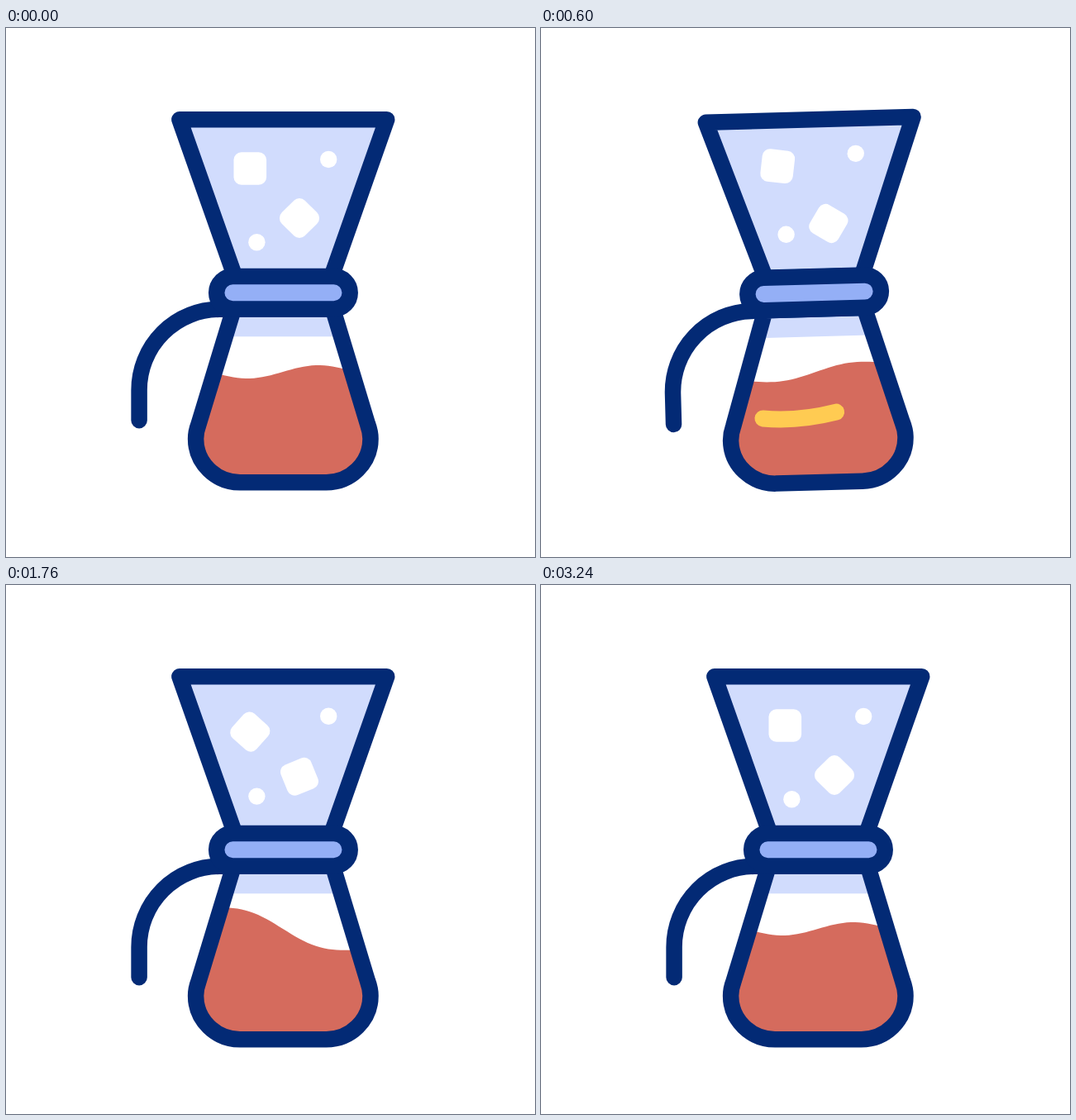
An HTML page for the animation above (3340 ms loop, 640 px wide and 640 px high).

```html
<!DOCTYPE html>
<html lang="en">
<head>
<meta charset="utf-8">
<title>Carafe</title>
<style>
  html, body { margin: 0; width: 100%; height: 100%; overflow: hidden; background: #fff; }
  svg { display: block; width: 100%; height: 100%; }
  .line { fill: none; stroke: #032a75; stroke-width: 19.5; stroke-linecap: round; stroke-linejoin: round; }
  .glass { fill: #d1dcfd; }
  .ice { fill: #fff; }
</style>
</head>
<body>
<svg viewBox="0 0 640 640">
  <defs>
    <path id="flask" d="M275.4 340 L233 479.5 C230.5 486 229.6 491 229.6 497 A53.5 52.7 0 0 0 283.1 549.7 H387.5 A53.5 52.7 0 0 0 441 497 C441 491 440 486 437.6 479.5 L395.4 340 Z"/>
    <clipPath id="inside"><use href="#flask"/></clipPath>
  </defs>
  <g id="carafe">
    <path class="line" style="fill:#d1dcfd" d="M209.9 110.7 H460.7 L393.7 301 H277 Z"/>
    <g class="ice">
      <rect id="cubeA" x="-19.8" y="-19.8" width="39.6" height="39.6" rx="9.4"/>
      <rect id="cubeB" x="-19.8" y="-19.8" width="39.6" height="39.6" rx="9.4"/>
      <circle id="dotA" r="10.2"/>
      <circle id="dotB" r="10.2"/>
    </g>
    <g clip-path="url(#inside)">
      <rect class="glass" x="220" y="335" width="230" height="38.3"/>
      <path id="drink" fill="#d56b5d"/>
    </g>
    <use href="#flask" class="line"/>
    <path class="line" d="M262 340.3 H258.7 A97.6 97.6 0 0 0 161.1 437.9 V474.7"/>
    <rect class="line" style="fill:#94aff6" x="254.7" y="300.5" width="161.5" height="39.4" rx="19.7"/>
  </g>
  <path id="swoosh" pathLength="100" fill="none" stroke="#ffcb52" stroke-width="20" stroke-linecap="round"
        d="M134.5 363 C146 410 185 467 264 472 C300 476 335 471 365 462.5"/>
</svg>
<script>
const LOOP = 3340, STIR_START = 280, STIR_END = 3240;
const $ = id => document.getElementById(id);
const clamp = x => Math.min(1, Math.max(0, x));

// Eased move through [time, value] keys; it rests only where it turns back
function track(...keys) {
  const rate = i => (keys[i + 1][1] - keys[i][1]) / (keys[i + 1][0] - keys[i][0]);
  const slopes = keys.map((_, i) => {
    if (i === 0 || i === keys.length - 1) return 0;
    const a = rate(i - 1), b = rate(i);
    return a * b > 0 ? 2 * a * b / (a + b) : 0;
  });
  return t => {
    const i = Math.max(0, keys.findLastIndex((k, n) => k[0] <= t && n < keys.length - 1));
    const [t0, a] = keys[i], [t1, b] = keys[i + 1], span = t1 - t0;
    const u = clamp((t - t0) / span), v = 1 - u;
    return v * v * (1 + 2 * u) * a + u * u * (3 - 2 * u) * b
      + span * u * v * (v * slopes[i] - u * slopes[i + 1]);
  };
}

const tilt = track([100, 0], [340, 3.15], [672, -2.2], [1005, 3.15], [1170, 0]);
const head = track([100, 0], [300, 64], [700, 100]);
const tail = track([280, 0], [810, 100]);

// Ice bobs one way, then the other, then settles
const bob = (peak, first, second) =>
  track([STIR_START, 0], [peak, first], [peak + 1150, second], [STIR_END, 0]);
const spin = track([STIR_START, 0], [820, 0.34], [2150, 1], [STIR_END, 0]);

const ice = [
  { id: "cubeA", x: 295.3, y: 170, dy: bob(1100, -12, 20), angle: 0, turn: 46 },
  { id: "cubeB", x: 355, y: 230, dy: bob(1000, 16.5, -3.5), angle: 45, turn: -74 },
  { id: "dotA", x: 390.2, y: 159, dy: bob(1100, -17, 10.5), angle: 0, turn: 0 },
  { id: "dotB", x: 303.4, y: 259.3, dy: bob(1000, -25, 4), angle: 0, turn: 0 }
];

// The drink's surface is a sloping line plus one sine ripple
const slope = track([STIR_START, 0], [980, -0.22], [1800, 0.3], [2750, 0]);

function surfacePath(t) {
  const stir = clamp((t - STIR_START) / (STIR_END - STIR_START));
  const ripple = 17 * Math.sin(Math.PI * stir) ** 2 - 8;
  const lean = slope(t);
  let d = "M220 570";
  for (let x = -115; x <= 115; x += 5) {
    d += ` L${335 + x} ${416 + lean * x + ripple * Math.sin(Math.PI * x / 86)}`;
  }
  return d + " V570 Z";
}

function draw(t) {
  $("carafe").setAttribute("transform", `rotate(${tilt(t)} 335.5 497)`);
  for (const { id, x, y, dy, angle, turn } of ice) {
    $(id).setAttribute("transform", `translate(${x} ${y + dy(t)}) rotate(${angle + turn * spin(t)})`);
  }
  $("drink").setAttribute("d", surfacePath(t));

  const from = tail(t), length = head(t) - from;
  const swoosh = $("swoosh").style;
  swoosh.visibility = length > 0.2 ? "visible" : "hidden";
  swoosh.strokeDasharray = `${Math.max(length, 0)} 300`;
  swoosh.strokeDashoffset = -from;
}

const start = performance.now();
function tick() {
  draw((performance.now() - start) % LOOP);
  requestAnimationFrame(tick);
}
tick();
</script>
</body>
</html>
```
